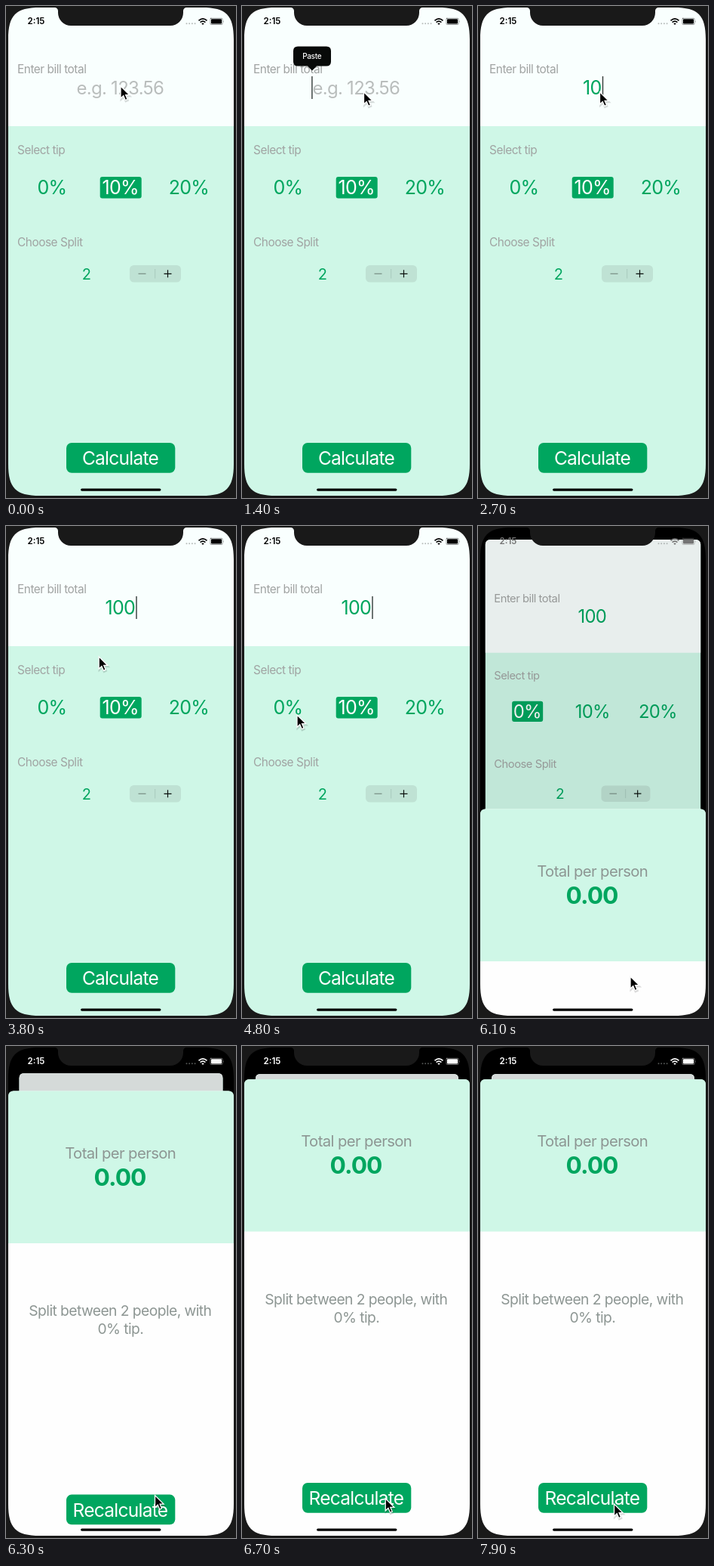
Write an HTML page that moves like this. It is 305 by 651 pixels and loops after 8 s.

```html
<!DOCTYPE html>
<html lang="en">
<head>
<meta charset="utf-8">
<title>Tip calculator</title>
<style>
html, body { margin: 0; width: 100%; height: 100%; overflow: hidden; background: #191919; }
svg { display: block; width: 305px; height: 651px; }
text { font-family: Inter, Roboto, sans-serif; font-optical-sizing: none; letter-spacing: -.03em; }
.label { font-size: 15.4px; fill: #a0a3a2; }
.big { font-size: 25px; text-anchor: middle; fill: #00a65f; }
.button { font-size: 24.5px; text-anchor: middle; fill: #fff; }
.mid { text-anchor: middle; fill: #8d9693; }
</style>
</head>
<body>
<svg viewBox="0 0 305 651">
  <rect x="3" y="2" width="299" height="646"/>

  <g id="page">
    <rect x="3" y="2" width="299" height="646" rx="7" fill="#cff7e7"/>
    <path d="M3 159V9Q3 2 10 2H295Q302 2 302 9V159Z" fill="#f9fffe"/>
    <text class="label" x="15" y="88.5">Enter bill total</text>
    <text class="label" x="15" y="195.5">Select tip</text>
    <text class="label" x="15" y="318">Choose Split</text>
    <text class="big" id="bill" x="151.3" y="117"></text>
    <rect id="caret" y="93" width="1.4" height="30" fill="#333b38"/>
    <g id="popup">
      <path d="M74 53.5H112Q118 53.5 118 59.5V73.5Q118 79.5 112 79.5H99L93 85.5 87 79.5H74Q68 79.5 68 73.5V59.5Q68 53.5 74 53.5Z" fill="#080a09"/>
      <text x="92.7" y="70" font-size="10" font-weight="500" text-anchor="middle" fill="#fff">Paste</text>
    </g>
    <rect id="chosen" y="226" height="28.5" rx="3" fill="#00a65f"/>
    <text class="big tip" x="61" y="249">0%</text>
    <text class="big tip" x="151.7" y="249">10%</text>
    <text class="big tip" x="242.5" y="249">20%</text>
    <text class="big" x="106.5" y="361.5" style="font-size:20px">2</text>
    <rect x="164" y="343" width="68" height="22.5" rx="5.5" fill="#bfe2d4"/>
    <path d="M197.7 348V360.5" stroke="#a8cabd"/>
    <path d="M175.5 354.3H185.5" stroke="#7d948a" stroke-width="1.3"/>
    <path d="M209.5 354.3H219.5M214.5 349.3V359.3" stroke="#0a100d" stroke-width="1.2"/>
    <rect x="80" y="578" width="144.3" height="39.7" rx="7" fill="#00a65f"/>
    <text class="button" id="calculate" x="151.5" y="607">Calculate</text>
    <rect id="dim" x="3" y="2" width="299" height="646" rx="7"/>
  </g>

  <g id="sheet">
    <rect width="299" height="660" x="3" rx="7" fill="#fefefe"/>
    <path d="M3 201.5V7Q3 0 10 0H295Q302 0 302 7V201.5Z" fill="#cff7e7"/>
    <text class="mid" x="151.7" y="89" font-size="20.3">Total per person</text>
    <text class="big" x="151" y="125" style="font-size:31.7px;font-weight:700">0.00</text>
    <text class="mid" x="151.3" y="297.5" font-size="19.3">Split between 2 people, with</text>
    <text class="mid" x="151.8" y="321.5" font-size="19.3">0% tip.</text>
    <rect x="80" y="534" width="144.3" height="39.7" rx="7" fill="#00a65f"/>
    <text class="button" x="151.5" y="563">Recalculate</text>
  </g>

  <path fill="#191919" fill-rule="evenodd" d="M0 0H305V651H0ZM45 2H64.5A4.5 4.5 0 0 1 69 6.5V9A17 17 0 0 0 86 26H218A17 17 0 0 0 235 9V6.5A4.5 4.5 0 0 1 239.5 2H260C292 2 302 12 302 44V606C302 638 292 648 260 648H45C13 648 3 638 3 606V44C3 12 13 2 45 2Z"/>
  <rect x="99" y="638.4" width="106.5" height="3.4" rx="1.7"/>

  <g id="status">
    <text x="28.6" y="24.3" font-size="11.5" font-weight="600" style="letter-spacing:0">2:15</text>
    <path d="M239.5 23.3H252" stroke="#8a8f8d" stroke-width="2" stroke-linecap="round" stroke-dasharray="0 3.7" opacity=".6"/>
    <g fill="none" stroke="currentColor" stroke-width="1.7">
      <path d="M255.5 19.3Q261 14.3 266.5 19.3M257.6 21.7Q261 18.6 264.4 21.7"/>
      <path d="M271.2 16.3H285.8Q287 16.3 287 17.5V23.3Q287 24.5 285.8 24.5H272.2Q271 24.5 271 23.3V17.5Q271 16.3 272.2 16.3Z" stroke-width=".8" opacity=".5"/>
    </g>
    <path d="M259.3 23.2Q261 21.7 262.7 23.2L261 25Z"/>
    <rect x="272" y="17.3" width="14" height="6.2" rx="1"/>
    <path d="M288 19V22Q289.2 20.5 288 19Z" opacity=".5"/>
  </g>

  <g id="cursor">
    <path d="M0 0V16.2L3.7 12.7 6.2 18.5 9 17.3 6.6 11.6H11.6Z" transform="translate(.6 1.6)" fill="none" stroke="#000" stroke-width="2.4" opacity=".14"/>
    <path d="M0 0V16.2L3.7 12.7 6.2 18.5 9 17.3 6.6 11.6H11.6Z" stroke="#fff" stroke-width="1.3"/>
  </g>
</svg>
<script>
const $ = id => document.getElementById(id);
const set = (id, attrs) => { for (const k in attrs) $(id).setAttribute(k, attrs[k]); };
const show = (id, on) => set(id, { visibility: on ? 'visible' : 'hidden' });
const tips = document.querySelectorAll('.tip');

// Times in ms
const LOOP = 8000, FOCUS = 400, POPUP = 700, TAP_TIP = 5000, PRESS = 5900, OPEN = 6024;
// time, typed text, caret x
const typing = [[FOCUS, '', 92.2], [2200, '1', 157], [2400, '10', 164.8], [2800, '100', 172.3]];
// time, x, y of the pointer tip
const path = [
  [0, 152, 106], [400, 161.5, 113.8], [3300, 161.5, 113.8], [4400, 73, 250], [5200, 73, 250],
  [5900, 202, 596], [6100, 202, 596], [6300, 197.5, 594.5], [7100, 183, 603], [7300, 183, 603], [7700, 180.5, 606]
];

function pointer(t) {
  const i = path.findIndex(p => p[0] > t);
  if (i < 0) return path[path.length - 1].slice(1);
  const [a, b] = [path[i - 1], path[i]];
  const u = (t - a[0]) / (b[0] - a[0]), e = u * u * (3 - 2 * u);
  return [1, 2].map(k => a[k] + (b[k] - a[k]) * e);
}

// Critically damped spring
function spring(s) {
  return s < 0 ? 0 : 1 - (1 + 20 * s) * Math.exp(-20 * s);
}

function draw(t) {
  const typed = typing.filter(k => k[0] <= t).pop() || [0, '', 0];
  const bill = $('bill');
  bill.textContent = typed[1] || 'e.g. 123.56';
  bill.style.fill = typed[1] ? '' : '#b9bdbc';
  bill.style.fontSize = typed[1] ? '' : '24px';
  set('caret', { x: typed[2] });
  show('caret', t >= FOCUS && t < TAP_TIP && (t - typed[0]) % 1000 < 550);
  show('popup', t >= POPUP && t < typing[1][0] - 100);

  const pick = t < TAP_TIP ? 1 : 0;
  set('chosen', pick ? { x: 124.7, width: 55 } : { x: 40, width: 43 });
  tips.forEach((el, i) => el.style.fill = i === pick ? '#fff' : '');
  set('calculate', { opacity: t >= PRESS && t < OPEN + 50 ? .2 : 1 });

  const p = spring((t - OPEN) / 1000);
  set('page', { transform: `translate(152.5 ${2 + 35 * p}) scale(${1 - .1 * p}) translate(-152.5 -2)` });
  set('dim', { opacity: .15 * p });
  set('sheet', { transform: `translate(0 ${651 - 607 * p})` });
  show('sheet', p > 0);
  const ink = `rgb(${[0, 0, 0].fill(Math.round(255 * p))})`;
  set('status', { fill: ink, color: ink });
  set('cursor', { transform: `translate(${pointer(t)})` });
}

function tick() {
  draw(performance.now() % LOOP);
  requestAnimationFrame(tick);
}
tick();
</script>
</body>
</html>
```
